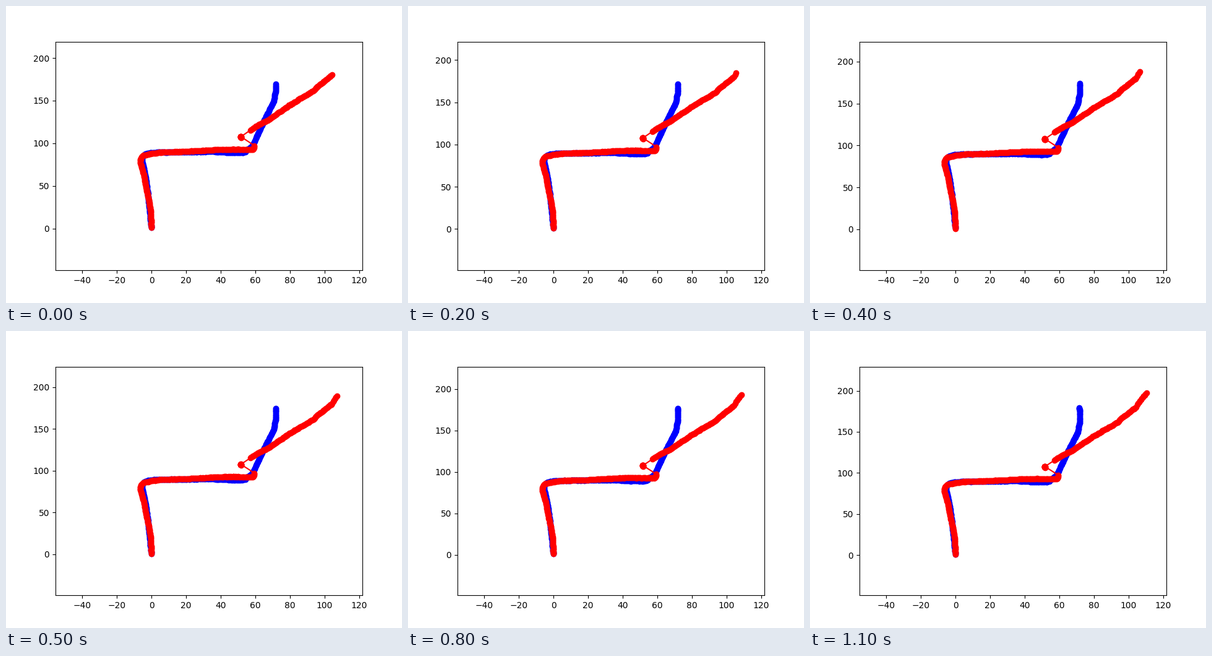
Animation, 640 px wide and 480 px high, one loop 1.2 s. Source, as a matplotlib script:

```python
import numpy as np
import matplotlib.pyplot as plt
from matplotlib.animation import FuncAnimation

FRAMES = 12
MARGIN = 50
SCALE = np.array([2.8, 1.35])  # pixels per data unit
STEP = 1.5                     # pixels between samples
rng = np.random.default_rng(4)


def smooth(v, width=5):
    padded = np.pad(v, width // 2, mode="reflect", reflect_type="odd")
    return np.convolve(padded, np.ones(width) / width, mode="valid")


def trace(*corners):
    """Dense, slightly noisy samples along a path with rounded corners."""
    p = np.array(corners) * SCALE
    s = np.r_[0, np.cumsum(np.hypot(*np.diff(p, axis=0).T))]
    d = np.linspace(0, s[-1], int(s[-1] / STEP))
    path = np.column_stack([smooth(np.interp(d, s, c)) for c in p.T])
    path[1:-1] += rng.normal(0, 0.2, path[1:-1].shape)
    return path / SCALE


blue_base = trace(
    (0, 0.95), (-2.6, 51), (-5.6, 82.5), (-4.7, 86.5), (-1.5, 88.8),
    (4, 89.5), (35, 90.3), (46, 89), (53.5, 89), (58.5, 97.5),
    (66, 130.6), (70.8, 150), (71.85, 163), (71.85, 169.25))

# The red path strays to a small cluster, then returns.
cluster = rng.normal((51.6, 107.7), 0.5 / SCALE, (10, 2))
red_base = np.vstack([
    trace((0.1, 0.9), (-0.5, 23), (-4.6, 64), (-6.8, 80), (-5.2, 85.5),
          (0, 88), (6, 89.6), (18, 90.2), (42, 93), (59.2, 92.5),
          (59.5, 97.3)),
    cluster,
    trace((57.3, 115.5), (60.4, 120), (68.3, 128.5), (80, 145),
          (93.5, 161.5), (96.5, 167.5), (104.4, 180.4))])

# Each path gains one sample per frame, slowing down as it grows.
t = np.arange(1, FRAMES) / (FRAMES - 1)
rise = t ** 0.8
blue_tip = blue_base[-1] + np.column_stack([-0.35 * t ** 3, 10.15 * rise])
red_tip = red_base[-1] + np.column_stack([6.1 * t, 16.9 * rise])

blue = np.vstack([blue_base, blue_tip])
red = np.vstack([red_base, red_tip])

fig, ax = plt.subplots(figsize=(6.4, 4.8), dpi=100)
blue_line, = ax.plot([], [], "bo-")
red_line, = ax.plot([], [], "ro-")


def update(i):
    b = blue[:len(blue_base) + i]
    r = red[:len(red_base) + i]
    blue_line.set_data(*b.T)
    red_line.set_data(*r.T)
    lo, hi = b.min(axis=0) - MARGIN, b.max(axis=0) + MARGIN
    ax.set_xlim(lo[0], hi[0])
    ax.set_ylim(lo[1], hi[1])
    return blue_line, red_line


anim = FuncAnimation(fig, update, frames=FRAMES, interval=100,
                     repeat=True, repeat_delay=0, blit=False)
plt.show()
```
